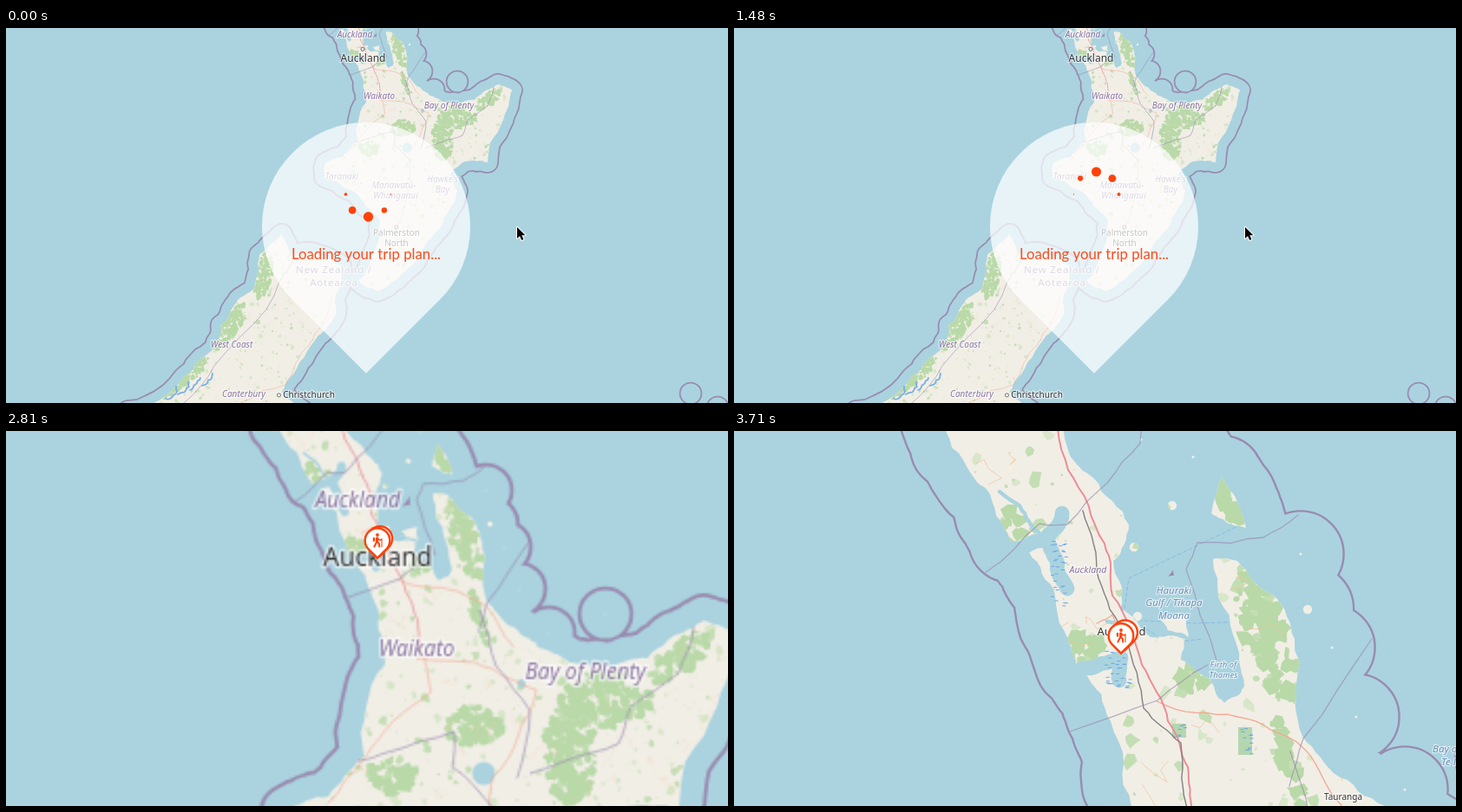
These frames come from a looping animation (832x433 px, 4.16 s). An HTML page with a canvas:

```html
<!DOCTYPE html>
<html lang="en">
<head>
<meta charset="utf-8">
<title>Trip plan map</title>
<style>
html, body { margin: 0; width: 100%; height: 100%; overflow: hidden; background: #aad3df; }
canvas { display: block; }
</style>
</head>
<body>
<canvas id="stage" width="832" height="433"></canvas>
<script>
const W = 832, H = 433, LOOP = 4160, TOP = 40;
const ZOOM = 4, SHIFT_X = -1199, SHIFT_Y = 130;
const SEA = '#aad3df', LAND = '#f1eee6', BORDER = '#998bb0', ORANGE = '#ff4208';
const PURPLE = '#8a739f', DARK = '#333', MARINE = '#6d90b8';
const ctx = document.getElementById('stage').getContext('2d');

// ---- helpers ----
function randomizer(seed) {
  return () => (seed = (seed * 16807) % 2147483647) / 2147483647;
}
const random = randomizer(4711);
const spread = size => (random() - .5) * size;

// Key points are in overview pixels; near() converts from close-up pixels.
const far = text => text.split(' ').map(p => p.split(',').map(Number));
const near = text => far(text).map(([x, y]) => [(x - SHIFT_X) / ZOOM, (y - SHIFT_Y) / ZOOM]);

// Midpoint displacement turns a few key points into a natural line.
function rough(pts, amount = .2, depth = 3) {
  for (; depth > 0; depth--) {
    pts = pts.flatMap((p, i) => {
      const q = pts[i + 1];
      if (!q) return [p];
      const k = spread(amount), dx = q[0] - p[0], dy = q[1] - p[1];
      return [p, [(p[0] + q[0]) / 2 - dy * k, (p[1] + q[1]) / 2 + dx * k]];
    });
  }
  return pts;
}

function pathOf(pts, closed = false) {
  const path = new Path2D();
  pts.forEach(p => path.lineTo(...p));
  if (closed) path.closePath();
  return path;
}

function stroke(g, path, color, width) {
  g.strokeStyle = color;
  g.lineWidth = width;
  g.stroke(path);
}

function disc(g, x, y, r, color) {
  g.fillStyle = color;
  g.beginPath();
  g.arc(x, y, r, 0, 7);
  g.fill();
}

function label(g, text, x, y, size, color, style = '', align = 'center') {
  g.font = `${style} ${size}px "Noto Sans", "Open Sans", sans-serif`;
  g.textAlign = align;
  g.textBaseline = 'middle';
  stroke.call(null, { stroke: () => g.strokeText(text, x, y), set strokeStyle(c) { g.strokeStyle = c; }, set lineWidth(w) { g.lineWidth = w; } }, null, 'rgba(255,255,255,.6)', 2.4);
  g.fillStyle = color;
  g.fillText(text, x, y);
}

// ---- geography ----
const westCoast = near('190,-110 244,0 290,66 318,127 334,126 340,140 370,190 395,270 405,277 434,335 458,433');
const southCoast = far('415,86 405,130 388,149 368,156 367,172 403,190 430,220 428,250 406,292 428,304 470,272 496,235 520,188 512,168 530,154 555,155 575,99 583,72 567,65 553,72 540,83 520,87 503,85 487,77');
const eastCoast = near('750,433 691,395 652,345 646,240 622,190 580,150 552,148 575,235 588,295 565,314 546,285 515,264 520,240 480,238 445,205 437,150 455,108 415,55 386,25 375,-110');
const southIsland = far('120,458 205,403 240,370 263,320 286,300 292,262 318,238 328,262 360,262 386,275 380,330 360,355 326,405 318,420 350,450');
const islands = [near('562,53 577,75 590,112 565,103 550,95 562,53'), near('491,218 523,212 524,238 500,230 491,218')];
const islets = far('426,-11 416,21 415,1 465,19 463,3 472,30 479,50 493,71 520,62 432,-25 417,-30 789,422 820,438');

const land = new Path2D();
for (const coast of [[...westCoast, ...southCoast, ...eastCoast], southIsland, ...islands]) {
  land.addPath(pathOf(rough(coast), true));
}
islets.forEach(([x, y], i) => {
  const r = i < 4 ? 1.3 : .4;
  land.moveTo(x + r, y);
  land.arc(x, y, r, 0, 7);
});

const inlets = ['334,134 360,125 378,95', '362,120 372,150 384,182', '400,275 428,268 446,262 444,288'].map(t => pathOf(rough(near(t))));
const creeks = ['306,70 335,95 352,118', '430,220 462,228'].map(t => pathOf(rough(near(t))));
const motorway = pathOf(rough(near('355,-50 385,45 427,130 436,190 470,270 500,335 523,388 528,440'), .12));
const railway = pathOf(rough(near('402,92 420,170 450,240 472,320 515,360 523,440'), .12));
const highways = [
  near('487,312 580,330 656,366 705,440'), near('418,222 436,212 444,228'),
  far('432,78 437,99 405,131 388,152'), far('430,83 466,88 487,98 466,140 452,228'), far('375,310 350,365 322,412 270,433')
].map(pts => pathOf(rough(pts, .15)));
const regions = [
  near('290,163 352,107 384,108 430,60 468,14 474,-40'), near('556,265 521,160 534,129 610,123 650,97'),
  near('387,347 488,311 546,270'), near('735,240 656,355 640,410'),
  far('460,60 468,87 484,108 478,140'), far('402,132 416,128 448,118 447,135 466,154'),
  far('484,138 514,128 526,124 532,106 555,90 562,68'), far('334,262 300,325 240,390 205,433')
].map(pts => pathOf(rough(pts, .1, 2)));

// Forest zones: centre, half width, half length, tilt.
const forests = [
  [520, 103, 22, 13, 0], [503, 128, 12, 24, 0], [556, 82, 7, 18, .9], [453, 26, 6, 22, -.4],
  [418, 139, 11, 9, 0], [458, 116, 13, 10, 0], [460, 64, 3, 13, -.3], [432, 39, 5, 4, 0],
  [401, 30, 5, 6, 0], [380, -5, 3, 5, 0], [443, -12, 3, 7, -.3],
  [297, 285, 9, 28, .2], [258, 345, 10, 32, .6], [200, 405, 11, 40, .95]
];

const greens = ['#b9d9a8', '#c4deb4', '#d8e6c9'].map(color => ({ color, path: new Path2D() }));
function blob(x, y, r, shade) {
  const path = greens[shade].path, sides = 7;
  for (let i = 0; i < sides; i++) {
    const a = i / sides * Math.PI * 2, d = r * (.55 + random() * .9);
    path[i ? 'lineTo' : 'moveTo'](x + d * Math.cos(a), y + d * Math.sin(a));
  }
  path.closePath();
}
for (let i = 0; i < 3800; i++) blob(120 + random() * 470, random() * 480 - 45, .3 + random() ** 3 * 2.2, random() < .4 ? 1 : 2);
for (const [x, y, rx, ry, tilt] of forests) {
  for (let i = 0; i < rx * ry * .65; i++) {
    const a = random() * 6.3, d = Math.sqrt(random());
    const u = rx * d * Math.cos(a), v = ry * d * Math.sin(a);
    blob(x + u * Math.cos(tilt) - v * Math.sin(tilt), y + u * Math.sin(tilt) + v * Math.cos(tilt), .8 + random() * 1.9, random() < .8 ? 0 : 1);
  }
}

const lanes = new Path2D();
for (let i = 0; i < 420; i++) {
  let x = 130 + random() * 450, y = random() * 470 - 40;
  lanes.moveTo(x, y);
  for (let j = 0; j < 4; j++) lanes.lineTo(x += spread(8), y += spread(8));
}

// px is the size of one screen pixel in map units.
function drawLand(g, px, close) {
  const limit = 24, line = (close ? 2.4 : 1.75) * px;
  stroke(g, land, BORDER, limit + line);
  stroke(g, land, SEA, limit - line);
  g.fillStyle = SEA;
  g.fill(land);
  if (close) drawFerries(g, px);
  g.fillStyle = LAND;
  g.fill(land);
  g.save();
  g.clip(land);
  for (const { color, path } of [...greens].reverse()) {
    g.fillStyle = color;
    g.fill(path);
  }
  stroke(g, lanes, close ? 'rgba(238,196,146,.7)' : 'rgba(240,200,160,.35)', close ? px : px * .5);
  g.restore();

  inlets.forEach(p => stroke(g, p, SEA, 4.2));
  creeks.forEach(p => stroke(g, p, SEA, 1.1));
  disc(g, 462, 138, 5.5, SEA);
  disc(g, 480, 95, 2, SEA);
  if (close) drawWetlands(g, px);
  highways.forEach(p => stroke(g, p, close ? '#f4a98f' : 'rgba(243,165,140,.7)', px * (close ? 1.3 : .7)));
  stroke(g, motorway, close ? '#ec8d96' : 'rgba(236,141,150,.7)', px * (close ? 2 : 1));
  if (close) stroke(g, railway, '#858083', 1.4 * px);
  g.globalAlpha = .65;
  regions.forEach(p => stroke(g, p, BORDER, px * (close ? 1.3 : .9)));
  g.globalAlpha = 1;
}

function drawFerries(g, px) {
  g.setLineDash([4 * px, 3 * px]);
  for (const t of ['452,218 530,222 600,220', '450,205 455,170 580,110', '470,225 500,245 540,240']) {
    stroke(g, pathOf(near(t)), '#8bb9e4', px);
  }
  g.setLineDash([]);
}

function drawWetlands(g, px) {
  const dot = randomizer(19);
  for (const [x, y, w, h] of [[393, 9, 4, 20], [410, 36, 7, 11], [447, 57, 4, 8], [428, 54, 4, 4]]) {
    if (y > 50) {
      g.fillStyle = '#b4d6b0';
      g.fillRect(x - w / 2, y - h / 2, w, h);
    }
    g.fillStyle = '#6aa8e4';
    for (let i = 0; i < w * h / 2.5; i++) g.fillRect(x + (dot() - .5) * w, y + (dot() - .5) * h, 4 * px, px);
  }
}

function drawOverview(g) {
  g.fillStyle = SEA;
  g.fillRect(0, -TOP, W, H + TOP);
  drawLand(g, 1, false);
  for (let i = 0; i < 4; i++) {
    const x = 184 + i * 14, y = 428 - i * 5;
    stroke(g, pathOf(rough([[x, y], [x + 12, y - 14]], .5)), '#78aee6', 1.8);
  }
  for (const [x, y] of far('411,24.5 450,230 314.5,424')) {
    disc(g, x, y, 2.4, '#777');
    disc(g, x, y, 1.4, '#fff');
  }
  const region = (text, x, y) => label(g, text, x, y, 10, PURPLE, 'italic 500');
  const town = (text, x, y, size = 10) => label(g, text, x, y, size, DARK);
  region('Auckland', 402, 8);
  region('Waikato', 430, 79.5);
  region('Bay of Plenty', 510.5, 90);
  region('Taranaki', 387, 172);
  region('Manawatū-', 447, 182);
  region('Whanganui', 449, 194);
  region('Hawke\'s', 503, 175);
  region('Bay', 503, 187);
  region('West Coast', 260, 366);
  region('Canterbury', 274, 423);
  town('Auckland', 411.5, 35.5, 12);
  town('Palmerston', 450, 237);
  town('North', 450, 249);
  town('Christchurch', 349, 424);
  g.letterSpacing = '0.8px';
  label(g, 'New Zealand /', 378, 280, 11.5, PURPLE);
  label(g, 'Aotearoa', 378, 295, 11.5, PURPLE);
  g.letterSpacing = '0px';
}

function drawCloseup(g) {
  g.fillStyle = SEA;
  g.fillRect(0, 0, W, H);
  g.save();
  g.translate(SHIFT_X, SHIFT_Y);
  g.scale(ZOOM, ZOOM);
  drawLand(g, 1 / ZOOM, true);
  g.restore();
  const marine = (text, x, y, size = 11.5, align = 'center') => label(g, text, x, y, size, MARINE, 'italic', align);
  label(g, 'Auckland', 408, 161.5, 10.5, PURPLE, 'italic');
  label(g, 'Auckland', 446.5, 232, 13, DARK);
  ['Hauraki', 'Gulf / Tīkapa', 'Moana'].forEach((text, i) => marine(text, 507, 184.5 + 14.5 * i));
  ['Firth of', 'Thames'].forEach((text, i) => marine(text, 564, 270.5 + 12 * i, 9.5));
  marine('Bay of Plenty', 805, 368, 11.5, 'left');
  marine('Te Moana', 815, 383, 11.5, 'left');
  label(g, 'Tauranga', 702, 423, 10, DARK);
}

function layer(height, offset, draw) {
  const canvas = document.createElement('canvas');
  canvas.width = W;
  canvas.height = height;
  const g = canvas.getContext('2d');
  g.lineJoin = g.lineCap = 'round';
  g.translate(0, offset);
  draw(g);
  return canvas;
}

const overview = layer(H + TOP, TOP, drawOverview);
const closeup = layer(H, 0, drawCloseup);

// ---- moving parts ----
function teardrop(x, y, r) {
  const path = new Path2D();
  path.arc(x, y, r, Math.PI * .75, Math.PI * .25);
  path.lineTo(x, y + r * Math.SQRT2);
  path.closePath();
  return path;
}

function drawLoader(phase) {
  ctx.fillStyle = 'rgba(255,255,255,.72)';
  ctx.fill(teardrop(415, 229, 120));
  for (let i = 0; i < 8; i++) {
    const away = Math.abs(((i - phase) % 8 + 12) % 8 - 4);
    const r = Math.min(6, 6.2 - 2.45 * away);
    const angle = i * Math.PI / 4;
    if (r > 0) disc(ctx, 417.5 + 26 * Math.sin(angle), 192 - 26 * Math.cos(angle), r, ORANGE);
  }
  ctx.font = '16.8px Lato, sans-serif';
  ctx.textAlign = 'center';
  ctx.textBaseline = 'alphabetic';
  ctx.fillStyle = '#ff4a1c';
  ctx.fillText('Loading your trip plan...', 415, 267);
}

function drawMarker(x, y) {
  const path = teardrop(x, y, 14.3);
  ctx.fillStyle = '#fff';
  ctx.fill(path);
  stroke(ctx, path, ORANGE, 2.4);
}

function drawHiker(x, y) {
  const limb = (width, text) => stroke(ctx, pathOf(far(text)), ORANGE, width);
  ctx.save();
  ctx.translate(x, y);
  ctx.lineCap = ctx.lineJoin = 'round';
  disc(ctx, 0, -6.5, 1.9, ORANGE);
  limb(2.4, '-4,-2.5 -4,0');
  limb(3, '-.4,-2.8 -.4,1.2');
  limb(2, '-3.6,7 -.6,1 2,3.6 2.2,7');
  limb(1.5, '0,-3 2,-.8 4.6,-.8');
  limb(1.1, '5,-2 5,7.2');
  ctx.restore();
}

function drawMarkers(x, y, gap) {
  drawMarker(x + gap, y - gap * .8);
  drawMarker(x, y);
  drawHiker(x, y);
}

function drawCursor(x, y) {
  const arrow = pathOf(far('0,0 0,13 3,10.2 5.2,15 7.4,14 5.3,9.3 9.4,9.3'), true);
  ctx.save();
  ctx.translate(x, y);
  ctx.lineJoin = 'round';
  stroke(ctx, arrow, '#fff', 2);
  ctx.fillStyle = '#000';
  ctx.fill(arrow);
  ctx.restore();
}

// The pointer glides off to the right, then shows briefly at the lower edge.
function cursorAt(step) {
  if (step <= 16) {
    const u = Math.max(0, step - 10) / 6, ease = u * u * (3 - 2 * u);
    return [589 + 213 * ease, 230 + 134 * ease];
  }
  if (step >= 21 && step <= 24) return [830, step < 24 ? 404 : 419];
  return null;
}

function drawMap(step) {
  const zoom = step < 19 ? 0 : step === 19 ? .473 : 1;
  const scale = 1 + (ZOOM - 1) * zoom;
  ctx.drawImage(overview, SHIFT_X * zoom, SHIFT_Y * zoom - TOP * scale, W * scale, (H + TOP) * scale);
  ctx.globalAlpha = Math.min(1, Math.max(0, .15 + (step - 21) * .75));
  ctx.drawImage(closeup, 0, 0);
  ctx.globalAlpha = 1;
}

// The picture advances in uneven steps of 140 or 150 ms and rests on the last one.
const SHORT = [0, 7, 17, 18], LAST = 25;
function stepAt(time) {
  let step = 0;
  for (let end = 0; step < LAST; step++) {
    end += SHORT.includes(step) ? 140 : 150;
    if (time < end) break;
  }
  return step;
}

function draw(step) {
  drawMap(step);
  if (step < 19) drawLoader(4.22 + 1.204 * step);
  else if (step === 19) drawMarkers(428, 126.5, 2.8);
  else drawMarkers(446, 236.5, 4.6);
  const cursor = cursorAt(step);
  if (cursor) drawCursor(...cursor);
}

const start = performance.now();
function tick() {
  draw(stepAt((performance.now() - start) % LOOP));
  requestAnimationFrame(tick);
}
tick();
</script>
</body>
</html>
```
